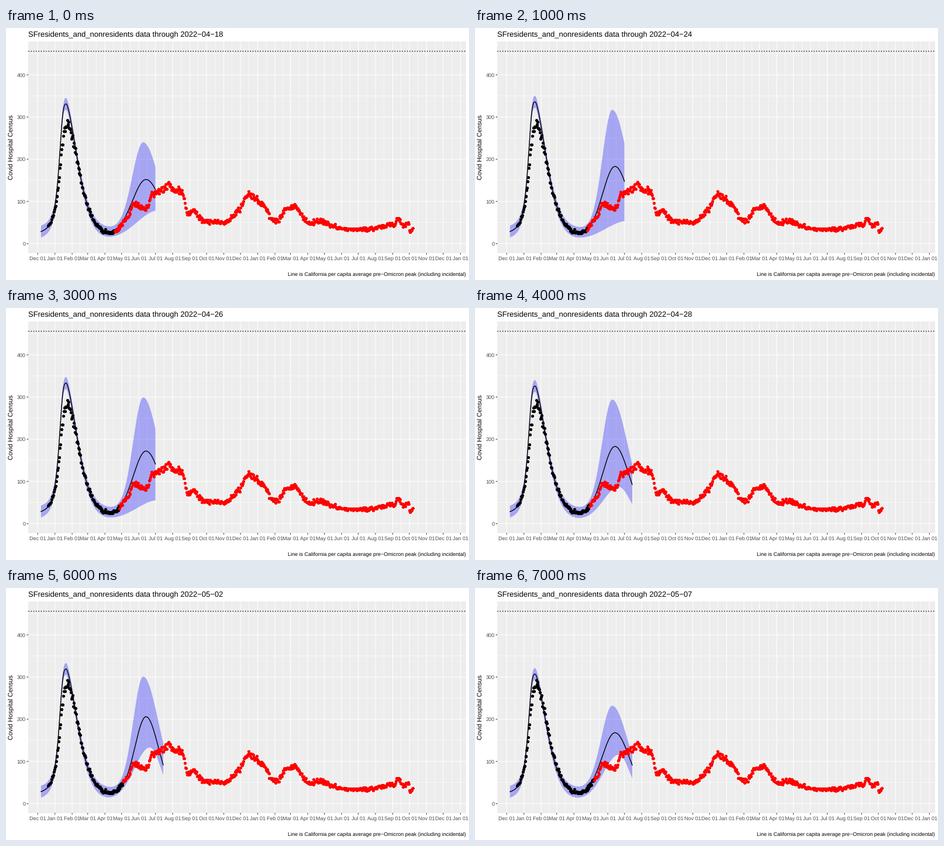
A matplotlib script that plays this animation: 792x432 px, repeating every 8000 ms.

```python
import numpy as np
import matplotlib.pyplot as plt
from matplotlib.animation import FuncAnimation
from matplotlib.patches import Rectangle

W, H = 792, 432
LEFT, RIGHT, TOP, BOTTOM = 38.4, 786.6, 23, 385.6
ZERO_Y, UNIT_Y = 369.7, 0.7235    # stage y of a count of 0, pixels per patient
DAY0_X, UNIT_X = 54.2, 0.9503     # stage x of Dec 1, pixels per day

plt.rcParams["font.family"] = "Liberation Sans"
plt.rcParams["text.hinting"] = "no_hinting"
fig = plt.figure(figsize=(W / 72, H / 72), dpi=72, facecolor="white")
ax = fig.add_axes([0, 0, 1, 1])
ax.set_xlim(0, W)
ax.set_ylim(H, 0)
ax.axis("off")


def day_x(day):
    return DAY0_X + UNIT_X * np.asarray(day)


def count_y(count):
    return ZERO_Y - UNIT_Y * np.asarray(count)


def rule(xs, ys, color, width, **kw):
    ax.plot(xs, ys, color=color, lw=width, solid_capstyle="butt",
            dash_capstyle="butt", snap=False, **kw)


def winter(day, peak, at=51.4, rise=13.6):
    """Winter wave: steep climb, slower decay, resting at 22 patients."""
    d = day - at
    climb = 1 / (1 + (np.maximum(-d, 0) / rise) ** 3.15)
    decay = np.exp(-(np.maximum(d, 0) / 29.3) ** 1.56)
    return 22 + (peak - 22) * climb * decay


def bump(day, height, at, rise, fall):
    """Bell curve with its own width on either side."""
    d = day - at
    return height * np.exp(-(d / np.where(d < 0, rise, fall)) ** 2)


# ---- panel, grid and labels
ax.add_patch(Rectangle((LEFT, TOP), RIGHT - LEFT, BOTTOM - TOP,
                       fc="#EDEDED", ec="none", zorder=0))

NAMES = "Jan Feb Mar Apr May Jun Jul Aug Sep Oct Nov Dec".split()
LENGTHS = [31, 28, 31, 30, 31, 30, 31, 31, 30, 31, 30, 31]
months = [(11 + i) % 12 for i in range(26)]
starts = np.concatenate([[0], np.cumsum([LENGTHS[m] for m in months[:-1]])])
month_x = day_x(starts)

for y in count_y(np.arange(50, 451, 100)):
    rule([LEFT, RIGHT], [y, y], "white", 0.6, zorder=1)
for x in (month_x[:-1] + month_x[1:]) / 2:
    rule([x, x], [TOP, BOTTOM], "white", 0.6, zorder=1)
for count in range(0, 401, 100):
    y = count_y(count)
    rule([LEFT, RIGHT], [y, y], "white", 1.07, zorder=1)
    rule([LEFT - 2.8, LEFT], [y, y], "#333333", 1.07)
    ax.text(33.8, y + 3.3, str(count), size=9, color="#4D4D4D", ha="right")
for x, m in zip(month_x, months):
    rule([x, x], [TOP, BOTTOM], "white", 1.07, zorder=1)
    rule([x, x], [BOTTOM, BOTTOM + 2.8], "#333333", 1.07)
    ax.text(x, 398, NAMES[m] + " 01", size=9, color="#4D4D4D", ha="center")

peak_y = count_y(456)
rule([LEFT, RIGHT], [peak_y, peak_y], "black", 1.42, ls=(0, (1, 2)), zorder=5)
ax.text(13.2, 204.5, "Covid Hospital Census", size=11, rotation=90,
        ha="center", va="baseline", rotation_mode="anchor")
ax.text(786.5, 425, "Line is California per capita average "
        "pre\u2212Omicron peak (including incidental)", size=9, ha="right")
title = ax.text(38, 15, "", size=13)

# ---- daily census: the winter wave, then turning points (day, count) with scatter
TURNS = [(128, 25), (140, 30), (151, 47), (166, 71), (170, 97), (193, 84),
         (199, 89), (204, 116), (223, 125), (237, 147), (243, 129), (260, 124),
         (270, 71), (282, 80), (290, 62), (305, 51), (341, 51), (353, 69),
         (364, 81), (372, 109), (383, 118), (411, 85), (419, 59), (433, 53),
         (446, 85), (464, 89), (478, 63), (490, 48), (509, 56), (539, 38),
         (570, 35), (603, 35), (635, 48), (641, 40), (648, 60), (657, 43),
         (668, 48), (669, 28), (675, 36)]

rng = np.random.default_rng(7)
days = np.arange(19, 676)
census = np.where(days < 128, winter(days, 285, at=54, rise=16),
                  np.interp(days, *np.array(TURNS).T))
scatter = np.clip(rng.normal(size=days.size), -2, 2) * (2 + 0.02 * census)
dots = np.column_stack([day_x(days), count_y(np.round(census + scatter))])

# ---- model runs: month, day, winter peak, forecast heights (line, top, bottom)
RUNS = [(4, 18, 331, 130, 204, 71), (4, 24, 336, 161, 281, 46),
        (4, 25, 335, 155, 272, 47), (4, 26, 333, 150, 263, 48),
        (4, 28, 326, 161, 258, 79), (4, 30, 322, 172, 262, 102),
        (5, 2, 319, 184, 265, 125), (5, 7, 307, 146, 196, 108)]
MARGIN = 14

band, = ax.fill([0, 0, 0], [0, 0, 0], fc="blue", ec="none", alpha=0.3, zorder=2)
fit, = ax.plot([], [], color="black", lw=1.4, zorder=3)
known = ax.scatter([], [], s=5.2 ** 2, c="black", lw=0, zorder=4)
future = ax.scatter([], [], s=5.2 ** 2, c="red", lw=0, zorder=4)


def update(i):
    month, date, peak, mid, high, low = RUNS[i]
    title.set_text("SFresidents_and_nonresidents data through "
                   f"2022\u2212{month:02d}\u2212{date:02d}")
    today = 31 + sum(LENGTHS[:month - 1]) + date - 1

    # later runs look two weeks further ahead, past the dip of the lower edge
    long_run = today >= 148
    day = np.linspace(6, 226 if long_run else 212, 440)
    wave = winter(day, peak)
    width = 50 - 0.117 * mid
    line = wave + bump(day, mid, 195, width, width + 3)
    upper = wave + MARGIN + bump(day, high, 190, 36 - 0.04 * high, 38)
    low_shape = (202, 39, 28) if long_run else (218, 55, 55)
    lower = wave - MARGIN + bump(day, low, *low_shape)

    x = day_x(day)
    fit.set_data(x, count_y(line))
    band.set_xy(np.column_stack([np.append(x, x[::-1]),
                                 count_y(np.append(upper, lower[::-1]))]))
    past = days <= today
    known.set_offsets(dots[past])
    future.set_offsets(dots[~past])
    return title, band, fit, known, future


anim = FuncAnimation(fig, update, frames=len(RUNS), interval=1000,
                     repeat=True, repeat_delay=0, blit=False)
plt.show()
```
